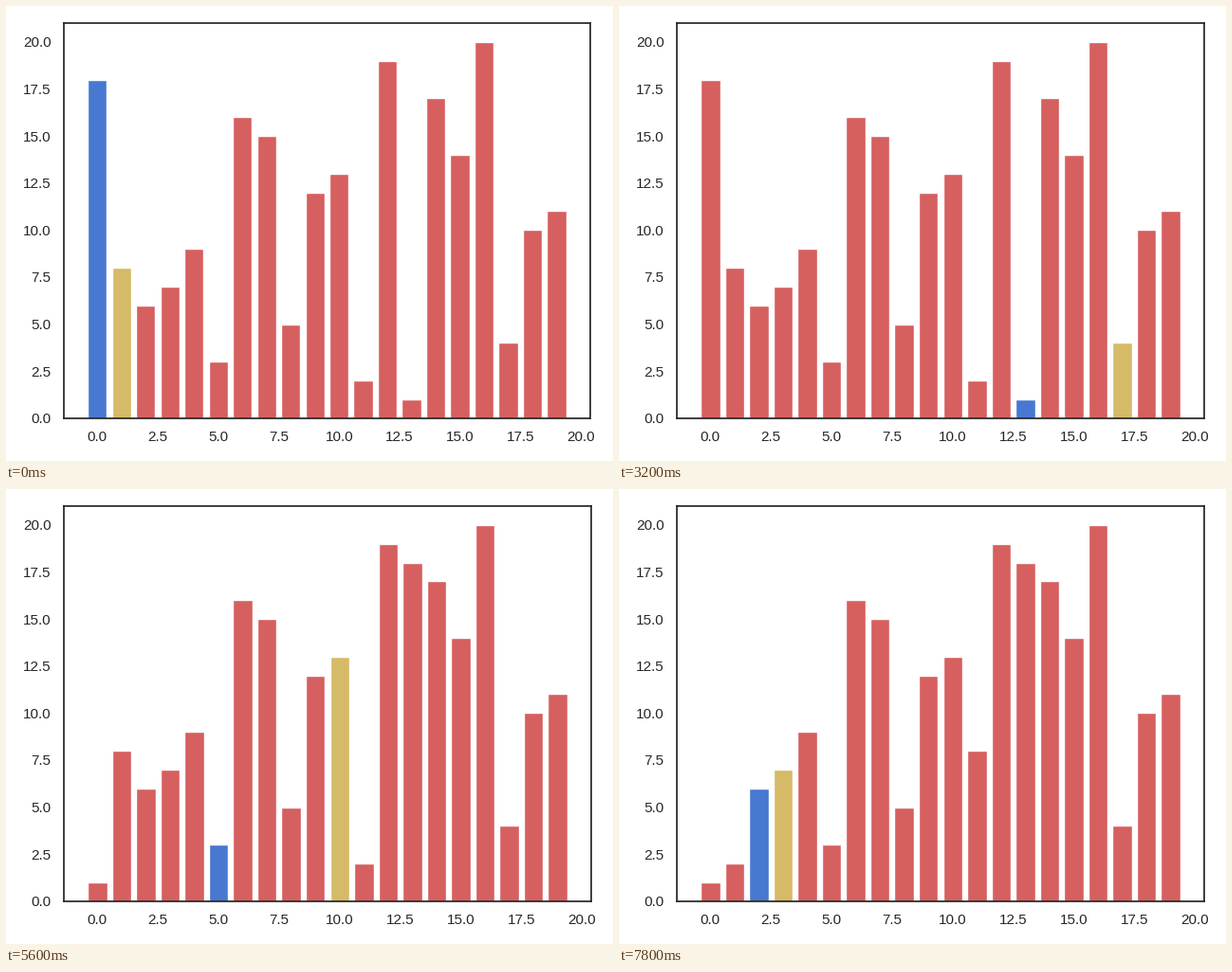
A matplotlib script that plays this animation: 640 px wide and 480 px high, repeating every 8000 ms.

```python
import matplotlib.pyplot as plt
from matplotlib.animation import FuncAnimation

BLUE, RED, GOLD = "#4878D0", "#D65F5F", "#D5BB67"
INK = ".15"
FRAMES, STEP_MS = 40, 200
VALUES = [18, 8, 6, 7, 9, 3, 16, 15, 5, 12, 13, 2, 19, 1, 17, 14, 20, 4, 10, 11]

plt.rcParams.update({
    "font.family": "Liberation Sans",
    "font.size": 12,
    "axes.edgecolor": INK,
    "axes.linewidth": 1.25,
    "xtick.color": INK,
    "ytick.color": INK,
    "xtick.labelsize": 11,
    "ytick.labelsize": 11,
    "xtick.major.size": 6,
    "ytick.major.size": 6,
    "xtick.bottom": False,
    "ytick.left": False,
})


def selection_sort(values):
    """Yield (values, blue index, gold index) for each comparison and swap."""
    data = list(values)
    for i in range(len(data) - 1):
        low = i
        for j in range(i + 1, len(data)):
            yield data[:], low, j
            if data[j] < data[low]:
                low = j
        data[i], data[low] = data[low], data[i]
        yield data[:], i, low


steps = [step for step, _ in zip(selection_sort(VALUES), range(FRAMES))]

fig, ax = plt.subplots(figsize=(6.4, 4.8), dpi=100)
bars = ax.bar(range(len(VALUES)), VALUES, color=RED, edgecolor="w", linewidth=1)
ax.set_ylim(0, 21)

# The layout settles on its second pass, so the opening frame is a bit narrower.
fig.tight_layout()
first_box = ax.get_position().frozen()
fig.tight_layout()
settled_box = ax.get_position().frozen()


def draw(n):
    data, blue, gold = steps[n]
    ax.set_position(settled_box if n else first_box)
    for k, (bar, height) in enumerate(zip(bars, data)):
        bar.set_height(height)
        bar.set_facecolor(BLUE if k == blue else GOLD if k == gold else RED)
    return bars.patches


anim = FuncAnimation(fig, draw, frames=FRAMES, interval=STEP_MS,
                     repeat=True, repeat_delay=0, blit=False)
plt.show()
```
